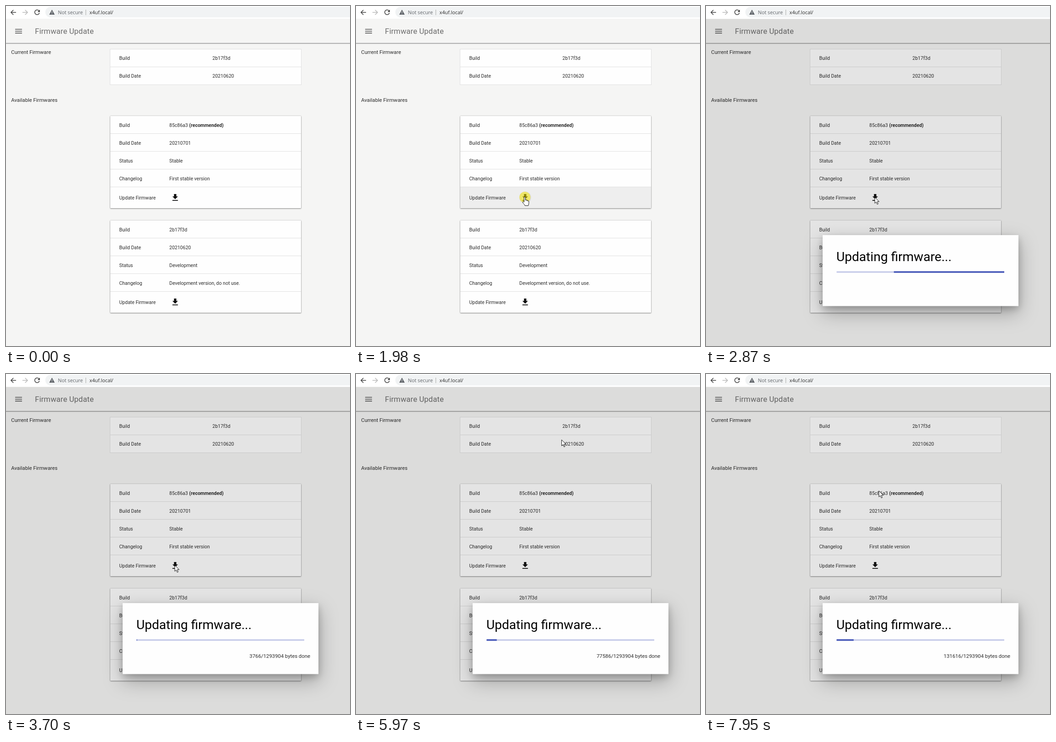
Recreate the animation shown at these times as an HTML page. Size 752 by 745 pixels, loop 8000 ms.

```html
<!DOCTYPE html>
<html lang="en">
<head>
<meta charset="utf-8">
<title>Firmware Update</title>
<style>
  html, body { margin: 0; height: 100%; overflow: hidden; background: #f5f5f4; }
  svg { display: block; width: 752px; height: 745px; }
  text { font: 10.5px Roboto, sans-serif; fill: #2b2b2b; white-space: pre; }
  .label { font-size: 11.33px; }
  .title { font-size: 16.7px; letter-spacing: .13px; fill: #6c6c6c; }
  .address { font: 10.8px "Open Sans", sans-serif; }
  .muted { fill: #5f6368; }
  .heading { font-size: 28.1px; fill: #000; }
  .bar { fill: #f5f5f4; filter: drop-shadow(0 1px 1px rgba(0,0,0,.55)); }
  .card { fill: #fefefe; filter: drop-shadow(0 0 1px rgba(0,0,0,.25)) drop-shadow(0 1px 1px rgba(0,0,0,.4)); }
  .dialog { fill: #fefefe; filter: drop-shadow(0 6px 8px rgba(0,0,0,.2)) drop-shadow(0 14px 20px rgba(0,0,0,.28)); }
  .line { fill: #e0e0e0; }
  .stroke { fill: none; stroke: #444; stroke-width: 1.6; }
  .fill { fill: #3f51b5; }
  .cursor { fill: #fff; stroke: #000; stroke-width: .9; stroke-linejoin: round; }
</style>
</head>
<body>
<svg id="stage" viewBox="0 0 752 745"></svg>
<script>
const LOOP = 8000, CLICK = 1980, OPEN = 2050, UNHOVER = 2120, COUNT_SHOWN = 3490, DETERMINATE = 3700;
const TOTAL = 1293904, TRACK_X = 285.5, TRACK_W = 366.5, SWEEP = 2000;
const CARD_X = 228, CARD_W = 417, CARD_H = 202, ROW = 39, CARDS = [241, 470];
const ICON = { x: 369.8, y: 419.4 };

const text = (x, y, s, cls = '') => `<text x="${x}" y="${y}" class="${cls}">${s}</text>`;
const rect = (x, y, w, h, attrs) => `<rect x="${x}" y="${y}" width="${w}" height="${h}" ${attrs}/>`;
const divider = y => rect(CARD_X, y, CARD_W, 1, 'class="line"');
const arrowIcon = (x, flip, color) =>
  `<path class="stroke" style="stroke:${color}" transform="translate(${x} 14) scale(${flip} 1)" d="M6 0H-5M.2-5.3L-5.1 0L.2 5.3"/>`;

const table = (top, valueX, rows) => Object.entries(rows).map(([name, value], i) => {
  const y = top + 23.5 + i * ROW;
  return text(247.5, y, name) + text(valueX, y, value);
}).join('');

const firmware = (top, rows) =>
  table(top, 357, rows) + [1, 2, 3, 4].map(i => divider(top + i * ROW - 1)).join('') +
  text(247.5, top + 182.5, 'Update Firmware') +
  `<path fill="#111" transform="translate(${ICON.x} ${top + 178.4}) scale(.86) translate(-12 -11.5)" d="M19 9h-4V3H9v6H5l7 7 7-7zM5 18v2h14v-2z"/>`;

const browserBar = rect(0, 0, 752, 28.5, 'fill="#fff"') +
  rect(86, 2, 700, 23, 'rx="11.5" fill="#f1f3f4"') +
  arrowIcon(16, 1, '#444') + arrowIcon(42, -1, '#bbb') +
  '<path class="stroke" d="M72.2 10.6A5.2 5.2 0 1 0 73 15.3"/><path fill="#444" d="M74 8v5.2h-5.2z"/>' +
  '<path fill="#5f6368" d="M100.5 8l6 11h-12z"/><path stroke="#f1f3f4" stroke-width="1.2" d="M100.5 12v3.3m0 1v1.2"/>' +
  text(113.5, 18, 'Not secure', 'address muted') +
  rect(174, 8, 1, 12, 'fill="#aaa"') +
  text(182.5, 18, 'x4uf.local/', 'address');

const page = rect(0, 28, 752, 717, 'fill="#f5f5f4"') +
  rect(-5, 28.5, 762, 52.5, 'class="bar"') +
  '<path class="stroke" style="stroke:#555" d="M20 51h15M20 55.2h15M20 59.4h15"/>' +
  text(63.3, 61, 'Firmware Update', 'title') +
  text(11.3, 105.3, 'Current Firmware', 'label') +
  text(11.3, 210, 'Available Firmwares', 'label') +
  rect(227.5, 94.5, 418, 78, 'fill="#fefefe" stroke="#e0e0e0"') + divider(133) +
  table(94.2, 451.3, { Build: '2b17f3d', 'Build Date': '20210620' }) +
  CARDS.map(y => rect(CARD_X, y, CARD_W, CARD_H, 'rx="1" class="card"')).join('') +
  rect(CARD_X, 0, CARD_W, ROW, 'id="hover" fill="#eee"') +
  `<circle id="halo" cx="${ICON.x}" cy="${ICON.y}" r="13" fill-opacity=".08"/>` +
  firmware(CARDS[0], {
    Build: '85c86a3 <tspan font-weight="700">(recommended)</tspan>', 'Build Date': '20210701',
    Status: 'Stable', Changelog: 'First stable version'
  }) +
  firmware(CARDS[1], {
    Build: '2b17f3d', 'Build Date': '20210620',
    Status: 'Development', Changelog: 'Development version, do not use.'
  });

const dialog = rect(0, 28.5, 752, 717, 'fill-opacity=".1"') +
  rect(255, 502, 428, 155.5, 'class="dialog"') +
  text(285, 558.5, 'Updating firmware...', 'heading') +
  rect(TRACK_X, 581.3, TRACK_W, 3.2, 'fill="#c5cae9"') +
  rect(0, 581.3, 0, 3.2, 'id="first" class="fill"') +
  rect(0, 581.3, 0, 3.2, 'id="second" class="fill"') +
  '<text id="count" class="label" x="665" y="621.7" text-anchor="end"></text>';

const stage = document.getElementById('stage');
stage.innerHTML = page + browserBar + `<g id="dialog">${dialog}</g>` +
  '<circle id="press" cx="369.3" cy="419" r="12" fill="#fff000" fill-opacity=".52"/>' +
  '<path id="arrow" class="cursor" d="M0 0V13.3L3.1 10.5L5.3 15.6L7.4 14.7L5.3 9.7H9.5Z"/>' +
  '<path id="hand" class="cursor" d="M-1.5 11V1.3a1.5 1.5 0 0 1 3 0V7.2a1.3 1.3 0 0 1 2.6.2v.6a1.3 1.3 0 0 1 2.5.4v.7a1.2 1.2 0 0 1 2.2.6V14c0 2-1 3-1.2 5H.3C0 17-2 15.5-4.5 12.4c-.9-1.6.8-2.8 1.9-1.6z"/>';
const el = {};
stage.querySelectorAll('[id]').forEach(e => el[e.id] = e);

const part = (t, from, to) => Math.min(1, Math.max(0, (t - from) / (to - from)));
const linear = u => u;
const smooth = u => u * u * (3 - 2 * u);
const easeOut = u => Math.sin(u * Math.PI / 2);

// Each move is [start, end, ...values reached]
const follow = (start, moves, t, ease) => moves.reduce(
  (now, [from, to, ...goal]) => now.map((v, i) => v + (goal[i] - v) * ease(part(t, from, to))), start);

const cursorMoves = [
  [70, 580, 372, 388], [580, 770, 360, 420], [840, 1120, 369, 419],
  [4440, 5000, 417, 412], [5270, 6110, 452, 123], [6110, 6330, 474, 101], [6330, 6660, 450, 122],
  [6980, 7810, 345, 256], [7810, 7950, 378, 256]
];
const cursorAt = t => follow([726, 694], cursorMoves, t, smooth);

const bursts = [[3830, 4310, 30150], [4440, 5000, 46267], [5270, 6550, 105220], [6980, 7740, 131616]];
const bytesAt = t => follow([3766], bursts, t, linear)[0];

const show = (e, on) => e.style.display = on ? '' : 'none';
const place = (e, x, y) => e.setAttribute('transform', `translate(${x} ${y})`);

function setBar(bar, from, to) {
  bar.setAttribute('x', TRACK_X + from * TRACK_W);
  bar.setAttribute('width', (to - from) * TRACK_W);
}

function drawHover(x, y, t) {
  const top = CARDS.find(c => y >= c && y < c + CARD_H);
  const on = t >= 70 && t < UNHOVER && top !== undefined && x > CARD_X && x < CARD_X + CARD_W;
  show(el.hover, on);
  if (!on) return;
  const row = Math.min(4, Math.floor((y - top) / ROW));
  el.hover.setAttribute('y', top + row * ROW);
  el.hover.setAttribute('height', row < 4 ? ROW : CARD_H - 4 * ROW);
}

function drawProgress(t) {
  if (t < DETERMINATE) {
    const p = (t - CLICK) % SWEEP / SWEEP;
    setBar(el.first, easeOut(part(p, .68, 1)), easeOut(part(p, .54, .87)));
    setBar(el.second, part(p, .2, .62) ** 2, part(p, .04, .42));
  } else {
    setBar(el.first, 0, bytesAt(t) / TOTAL);
    setBar(el.second, 0, 0);
  }
  const done = Math.round(bytesAt(Math.floor(t / 70) * 70));
  el.count.textContent = t < COUNT_SHOWN ? '' : `${done}/${TOTAL} bytes done`;
}

function draw(t) {
  const [x, y] = cursorAt(t);
  const onIcon = Math.hypot(x - ICON.x, y - ICON.y) < 13;
  const hand = onIcon && t < OPEN;
  drawHover(x, y, t);
  show(el.halo, onIcon && t < UNHOVER);
  show(el.press, t >= CLICK && t < OPEN);
  show(el.hand, hand);
  show(el.arrow, !hand && t >= 70);
  place(el.hand, x, y - .5);
  place(el.arrow, x, y);
  show(el.dialog, t >= OPEN);
  if (t >= OPEN) drawProgress(t);
}

function tick() {
  draw(performance.now() % LOOP);
  requestAnimationFrame(tick);
}
tick();
</script>
</body>
</html>
```
